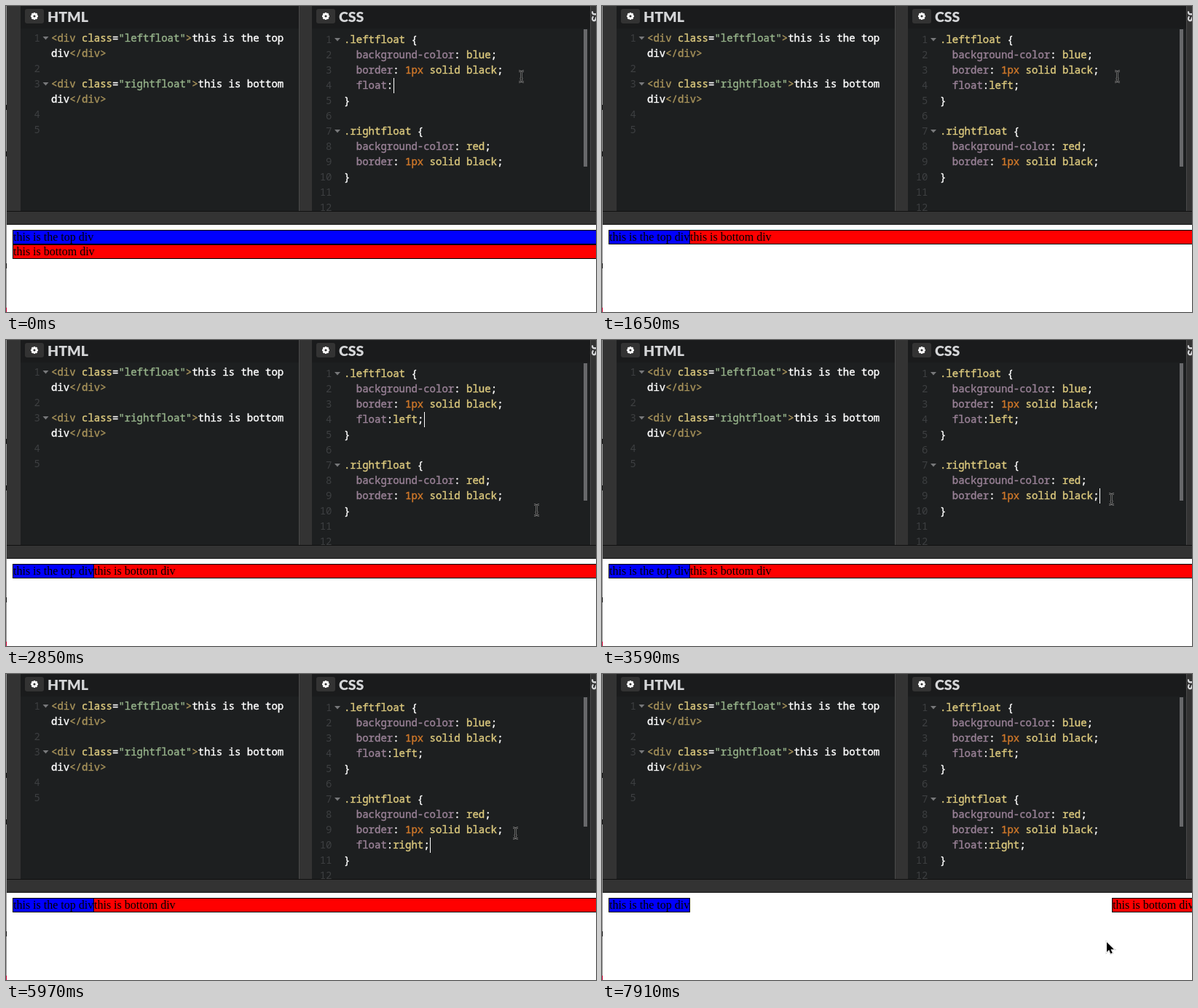
Recreate the animation shown at these times as an HTML page with a canvas. Size 810 by 421 pixels, loop 8 s.

```html
<!DOCTYPE html>
<html lang="en">
<head>
<meta charset="utf-8">
<title>Floating divs</title>
<style>
  html, body { margin: 0; width: 100%; height: 100%; overflow: hidden; background: #fff; }
  canvas { display: block; }
</style>
</head>
<body>
<canvas id="stage" width="810" height="421"></canvas>
<script>
const ctx = document.getElementById('stage').getContext('2d');
const LOOP = 8000, ROW = 21, CHAR = 8.4, CSS_X = 464;
const CODE = '500 14px "Noto Sans Mono", monospace';
const TITLE = '900 19.5px Lato, sans-serif';
const PAGE = '16px "Liberation Serif", serif';
const WHITE = '#fff', YELLOW = '#ddca7e', GOLD = '#a7925a', GREEN = '#96b38a',
      PURPLE = '#9a8297', ORANGE = '#d0782a', PANEL = '#1d1f20', HEADER = '#1a1b1c', BAR = '#333';

// Stepped timelines: [start in ms, value]
const FIRST_LENGTH = [[0, 8], [300, 9], [450, 10], [600, 12], [750, 13]];
const SECOND_LENGTH = [[0, 0], [4190, 2], [4490, 3], [4640, 5], [4790, 7], [5080, 8],
  [5380, 9], [5530, 10], [5680, 12], [5830, 13], [5970, 14]];
const CARET_ON = [[0, true], [1200, false], [1800, true], [2250, false], [2700, true],
  [6570, false], [7010, true], [7460, false]];
const LAYOUT = [[0, 'stacked'], [1650, 'left'], [6420, 'both']];
const MOUSE = [[0, [707.5, 97]], [1950, [716, 122]], [2100, [732, 175]], [2250, [747, 235]],
  [2400, [757, 277]], [2550, [759, 288]], [2700, [744, 262]], [2850, [728.5, 234]],
  [3000, [713, 234]], [3140, [706, 232]], [3440, [703, 225]], [3590, [699.5, 219]],
  [7460, [688, 330]], [7610, [682, 390]], [7910, [692.5, 368]]];

const at = (steps, t) => steps.filter(([start]) => start <= t).pop()[1];

function rect(color, x, y, w, h) {
  ctx.fillStyle = color;
  ctx.fillRect(x, y, w, h);
}

function text(str, x, y, color, font, align = 'left') {
  ctx.font = font;
  ctx.fillStyle = color;
  ctx.textAlign = align;
  ctx.fillText(str, x, y);
}

// A hairline around each glyph gives the heavier smoothing of the editor font.
function runs(x, y, parts) {
  ctx.lineWidth = 0.4;
  for (const [color, str] of parts) {
    text(str, x, y, color, CODE);
    ctx.strokeStyle = color;
    ctx.strokeText(str, x, y);
    x += str.length * CHAR;
  }
}

// Numbers sit on the given rows; a wrapped line takes two rows.
function gutter(right, y, rows, folds) {
  rows.forEach((row, i) => text(i + 1, right, y + row * ROW, '#3d3f41', CODE, 'right'));
  for (const row of folds) {
    const top = y + row * ROW - 7;
    ctx.fillStyle = '#77787a';
    ctx.beginPath();
    ctx.moveTo(right + 3.5, top);
    ctx.lineTo(right + 11.5, top);
    ctx.lineTo(right + 7.5, top + 4.5);
    ctx.fill();
  }
}

function gear(x, y) {
  ctx.save();
  ctx.translate(x, y);
  for (let i = 0; i < 4; i++) {
    rect(WHITE, -1.2, -5, 2.4, 10);
    ctx.rotate(Math.PI / 4);
  }
  ctx.strokeStyle = WHITE;
  ctx.lineWidth = 2.3;
  ctx.beginPath();
  ctx.arc(0, 0, 2.8, 0, 7);
  ctx.stroke();
  ctx.fillStyle = BAR;
  ctx.beginPath();
  ctx.arc(0, 0, 1.6, 0, 7);
  ctx.fill();
  ctx.restore();
}

function panel(x, title) {
  rect(PANEL, x, 0, 382, 283);
  rect(HEADER, x, 0, 382, 31);
  ctx.fillStyle = BAR;
  ctx.beginPath();
  ctx.roundRect(x + 6, 4, 26, 20, 3);
  ctx.fill();
  gear(x + 19, 14);
  text(title, x + 37, 22, '#d5d6d8', TITLE);
}

function htmlEditor() {
  panel(20, 'HTML');
  gutter(47, 49, [0, 2, 3, 5, 6], [0, 3]);
  const block = (y, name, content) => {
    runs(62, y, [[GOLD, '<div '], [YELLOW, 'class'], [WHITE, '='], [GREEN, `"${name}"`],
      [GOLD, '>'], [WHITE, content]]);
    runs(62, y + ROW, [[WHITE, 'div'], [GOLD, '</div>']]);
  };
  block(49, 'leftfloat', 'this is the top');
  block(112, 'rightfloat', 'this is bottom');
}

function cssParts(line) {
  if (line.startsWith('.')) return [[YELLOW, line.slice(0, -1)], [WHITE, '{']];
  if (line === '}') return [[WHITE, line]];
  const [, property, colon, value] = line.match(/^([^:]*)(:?)(.*)$/);
  const colorOf = s => s === ';' ? WHITE : s === '1px' ? ORANGE : YELLOW;
  return [[PURPLE, property], [WHITE, colon],
    ...value.split(/(1px|;)/).map(s => [colorOf(s), s])];
}

function cssEditor(t) {
  const first = '  float:left;'.slice(0, at(FIRST_LENGTH, t));
  const second = '  float:right;'.slice(0, at(SECOND_LENGTH, t));
  const rule = (name, color, float) => [`.${name} {`, `  background-color: ${color};`,
    '  border: 1px solid black;', ...(float ? [float] : []), '}'];
  const lines = [...rule('leftfloat', 'blue', first), '', ...rule('rightfloat', 'red', second)];

  panel(420, 'CSS');
  gutter(447.5, 51, [...Array(12).keys()], [0, 6]);
  lines.forEach((line, i) => runs(CSS_X, 51 + i * ROW, cssParts(line)));
  rect('#67686a', 793, 32, 5, t < 4190 ? 189 : 178);

  // The caret rests after the closing brace for a moment, marking the pair.
  const bracket = t >= 3000 && t < 3440;
  if (bracket) {
    rect('#aaa', CSS_X, 245, 9, 1);
    rect('#aaa', CSS_X + 101, 182, 8, 1);
  }
  const row = t < 3000 ? 3 : bracket ? 9 : t < 4190 ? 8 : 9;
  if (at(CARET_ON, t)) {
    rect(WHITE, Math.floor(CSS_X + 0.9 + lines[row].length * CHAR), 36 + row * ROW, 1, ROW);
  }
}

function box(color, x, y, w, label, labelX = x + 1) {
  rect('#000', x, y, w, 20);
  rect(color, x + 1, y + 1, w - 2, 18);
  text(label, labelX, y + 15, '#000', PAGE);
}

function preview(layout) {
  const top = 'this is the top div', bottom = 'this is bottom div';
  rect(WHITE, 1, 300, 809, 121);
  rect('#111', 1, 300, 809, 1);
  if (layout === 'stacked') {
    box('#00f', 9, 308, 820, top);
    box('#f00', 9, 328, 820, bottom);
    return;
  }
  if (layout === 'left') box('#f00', 9, 308, 820, bottom, 121);
  else box('#f00', 700, 308, 114, bottom);
  box('#00f', 9, 308, 112, top);
}

function frame() {
  rect(BAR, 0, 0, 810, 300);
  rect('#4a4a4a', 402, 0, 1, 283);
  rect('#4a4a4a', 802, 0, 1, 283);
  ctx.save();
  ctx.translate(804, 7);
  ctx.rotate(Math.PI / 2);
  text('JS', 0, 0, '#d5d6d8', '900 15px Lato, sans-serif');
  ctx.restore();
}

function pageEdge() {
  rect('#999', 0, 0, 1, 421);
  for (const y of [136, 200, 354]) rect('#111', 0, y, 1, 7);
  rect('#c03', 0, 415, 1, 6);
}

function strokeTwice(path, outer, inner) {
  for (const [color, width] of [outer, inner]) {
    ctx.strokeStyle = color;
    ctx.lineWidth = width;
    ctx.stroke(path);
  }
}

const beam = new Path2D('M-3.5-7.5Q0-7.5 0-5Q0-7.5 3.5-7.5M0-5V5M-3.5 7.5Q0 7.5 0 5Q0 7.5 3.5 7.5M-2 3H2');
const arrow = new Path2D('M.5 1V14.5L3.6 11.6L5.8 16.8L8.2 15.8L6 10.7H10.3Z');

function mouse(t) {
  ctx.save();
  ctx.translate(...at(MOUSE, t));
  if (t < 7460) {
    strokeTwice(beam, ['#858585', 2.4], ['#1a1a1a', 1]);
  } else {
    strokeTwice(arrow, ['#bbb', 2.6], [WHITE, 1.8]);
    ctx.fillStyle = '#000';
    ctx.fill(arrow);
  }
  ctx.restore();
}

function draw(now) {
  const t = now % LOOP;
  frame();
  htmlEditor();
  cssEditor(t);
  rect(BAR, 1, 282, 809, 18);
  rect('#111', 1, 282, 809, 1);
  preview(at(LAYOUT, t));
  pageEdge();
  mouse(t);
}

const start = performance.now();
function tick() {
  draw(performance.now() - start);
  requestAnimationFrame(tick);
}
tick();
</script>
</body>
</html>
```
